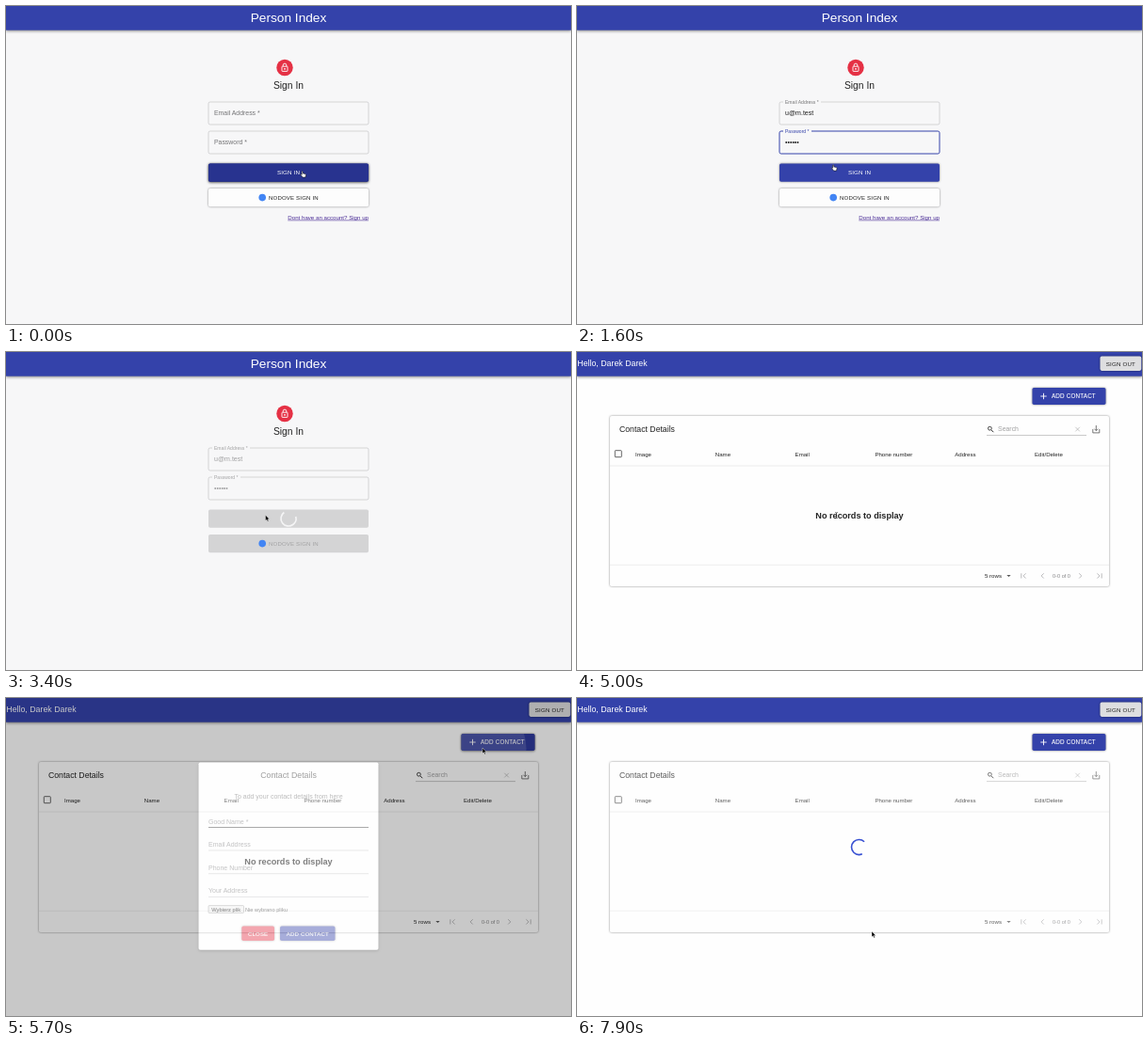
Animation, 600 px wide and 338 px high, one loop 8 s. Source, as an HTML page:

```html
<!DOCTYPE html>
<html lang="en">
<head>
<meta charset="utf-8">
<title>Sign in and add a contact</title>
<style>
html, body { margin: 0; width: 100%; height: 100%; overflow: hidden; background: #f7f7f8; }
svg { display: block; width: 100vw; height: 100vh; font-family: "Liberation Sans", Arial, sans-serif; }
.low { filter: drop-shadow(0 .7px .8px #0007); }
.high { filter: drop-shadow(0 1.4px 1.8px #0008); }
.bar { filter: drop-shadow(0 1.2px 1.6px #0007); }
.caps { letter-spacing: .17px; }
.line { fill: none; }
</style>
</head>
<body>
<svg id="stage" viewBox="0 0 600 338" preserveAspectRatio="none"></svg>
<script>
const LOOP = 8000;
const BLUE = '#3442aa', DARK = '#28338f', RED = '#e53145', INK = '#222', GREY = '#747476';

// Timing of the interface, in ms
const EMAIL = 300, PASSWORD = 900, SUBMIT = 2000, HOME = 4200, READY = 4650;
const PRESS = 5290, OPEN = 5600, FOCUS = 6800, SAVE = 7400;

// Pointer: time, x, y, shape until the next entry
const pointer = [
  [0, 314, 175.5, 'hand'], [80, 314, 175.5, 'hand'], [300, 270, 114, 'beam'],
  [1300, 270, 114, 'hand'], [1600, 271.5, 168.5, 'hand'], [1900, 275.5, 173, 'hand'],
  [SUBMIT, 275.5, 173, 'arrow'], [HOME, 275.5, 173.5, 'beam'], [5050, 275.5, 173.5, 'arrow'],
  [5300, 506, 53, 'arrow'], [5750, 506, 53, 'arrow'], [6400, 317, 131, 'beam'],
  [6900, 317, 131, 'arrow'], [7300, 313, 248, 'hand'], [SAVE, 313, 248, 'arrow'], [LOOP, 313, 248, 'arrow']
];

const clamp = v => Math.max(0, Math.min(1, v));
const ease = u => u * u * (3 - 2 * u);
const ramp = (t, from, span) => ease(clamp((t - from) / span));
const mix = (a, b, u) => a + (b - a) * u;

const text = (x, y, size, str, fill = INK, more = '') =>
  `<text x="${x}" y="${y}" font-size="${size}" fill="${fill}" ${more}>${str}</text>`;
const mid = (x, y, size, str, fill, more = '') => text(x, y, size, str, fill, 'text-anchor="middle" ' + more);
const box = (x, y, w, h, fill, more = '') =>
  `<rect x="${x}" y="${y}" width="${w}" height="${h}" fill="${fill}" ${more}/>`;
const path = (d, stroke, width = .8, more = '') =>
  `<path class="line" d="${d}" stroke="${stroke}" stroke-width="${width}" ${more}/>`;
const rule = (x1, x2, y, stroke, width = .5) => path(`M${x1} ${y}H${x2}`, stroke, width);
const group = (opacity, body) => `<g opacity="${opacity}">${body}</g>`;
const button = (x, y, w, h, fill, level = 'low') => box(x, y, w, h, fill, `rx="1.8" class="${level}"`);

function spinner(t, x, y, color, start, turn) {
  const p = ((t - start) / 1400 % 1 + 1) % 1;
  const grow = ease(clamp(p * 2)), slide = ease(clamp(p * 2 - 1));
  const dash = mix(1, 100, grow), offset = 15 * grow + 110 * slide;
  return `<circle class="line" cx="${x}" cy="${y}" r="8" stroke="${color}" stroke-width="1.6" pathLength="126"
    stroke-dasharray="${dash} 126" stroke-dashoffset="${-offset}" transform="rotate(${p * 360 + turn} ${x} ${y})"/>`;
}

function outlined(t, y, label, width, value, from, to) {
  const focused = t >= from && t < to, off = t >= SUBMIT, up = ramp(t, from, 150);
  const color = off ? '#a2a2a3' : focused ? BLUE : GREY;
  return box(215, y, 170, 24, 'none',
      `rx="1.8" stroke="${focused ? BLUE : '#bdbdbe'}" stroke-width="${focused ? 1 : .6}"`) +
    (up > .5 ? box(219, y - 1, width, 2, '#f7f7f8') : '') +
    text(221, mix(y + 14.2, y + 1.7, up), mix(6.9, 5.05, up), label + ' *', color) +
    text(221, y + 14.2, 7.05, value, off ? '#a2a2a3' : INK);
}

const typed = (t, str, from, span) => str.slice(0, Math.round(str.length * clamp((t - from) / span)));

function signIn(t) {
  const off = t >= SUBMIT;
  const hover = t < 1000 ? 1 - ramp(t, 100, 200) : ramp(t, 1600, 200);
  const lock = `<circle cx="296" cy="65.5" r="8.7" fill="${RED}"/>` +
    box(293, 64.2, 6, 5.2, 'none', 'rx=".5" stroke="#fff" stroke-width=".9"') +
    path('M294.2 64.2V62.9a1.8 1.8 0 0 1 3.6 0V64.2', '#fff', .9) +
    '<circle cx="296" cy="66.8" r=".9" fill="#fff"/>';
  const actions = off
    ? box(215, 167.5, 170, 19.3, '#d4d4d5', 'rx="1.8"') + box(215, 194, 170, 19.3, '#d4d4d5', 'rx="1.8"') +
      spinner(t, 300, 177, '#f5f5f6', 1090, 0)
    : button(215, 167.5, 170, 19.3, BLUE) +
      group(hover, button(215, 167.5, 170, 19.3, DARK, 'high')) +
      mid(300, 179.4, 6.2, 'SIGN IN', '#fff', 'class="caps"') +
      button(215, 194, 170, 19.3, '#fdfdfd') +
      text(385, 226.6, 6.15, 'Dont have an account? Sign up', '#4a2c96',
        'text-anchor="end" text-decoration="underline"');
  return box(0, 0, 600, 338, '#f7f7f8') + box(0, -5, 600, 30.7, BLUE, 'class="bar"') +
    mid(300, 17.2, 13.7, 'Person Index', '#fff') + lock + mid(300, 88.2, 10.3, 'Sign In') +
    outlined(t, 102, 'Email Address', 40, typed(t, 'u@m.test', 400, 400), EMAIL, PASSWORD) +
    outlined(t, 133, 'Password', 30, typed(t, '••••••', 950, 350), PASSWORD, SUBMIT) +
    actions + '<circle cx="272.2" cy="203.6" r="3.8" fill="#4285f4"/>' +
    text(279, 205.8, 6.05, 'NODOVE SIGN IN', off ? '#a2a2a3' : INK, 'class="caps"');
}

function addButton(t) {
  const lit = ramp(t, 5200, 200) * (1 - ramp(t, OPEN, 200));
  const reach = 47 * clamp((t - PRESS) / 210);
  return button(483.5, 38, 78, 18, BLUE) + group(lit, button(483.5, 38, 78, 18, DARK, 'high')) +
    `<clipPath id="edge">${box(483.5, 38, 78, 18, '#000', 'rx="1.8"')}</clipPath>` +
    `<circle cx="505.5" cy="53" r="${reach}" fill="#fff" opacity="${.22 * (1 - ramp(t, OPEN, 250))}" clip-path="url(#edge)"/>` +
    path('M492.3 47h6.4M495.5 43.8v6.4', '#fff', .9) +
    text(504, 49.3, 6.3, 'ADD CONTACT', '#fff', 'class="caps" stroke="#fff" stroke-width=".1"');
}

function table(t) {
  const loading = t < READY || t > SAVE + 150;
  const heads = ['Image', 'Name', 'Email', 'Phone number', 'Address', 'Edit/Delete'];
  const pager = '#b4b4b6';
  return box(35, 68, 530, 181, '#fefefe', 'rx="1.8" class="low"') +
    text(45, 84.8, 8.7, 'Contact Details') +
    '<circle class="line" cx="438.4" cy="81.2" r="1.9" stroke="#333" stroke-width=".9"/>' +
    path('M439.8 82.7l2.5 2.5', '#333', 1) + text(447, 84.4, 6.95, 'Search', '#a0a0a1') +
    rule(435, 541, 88.6, '#8c8c8d') + path('M529.3 79.8l4.6 4.6m0-4.6l-4.6 4.6', '#b0b0b1', .7) +
    path('M547.8 82v3.9h7V82M551.3 78v5.6m-1.9-1.9l1.9 1.9 1.9-1.9', '#555', .8) +
    box(40.3, 104.7, 7, 7, 'none', 'rx=".6" stroke="#555" stroke-width=".9"') +
    heads.map((h, i) => text(62 + i * 84.8, 110.6, 6.1, h)).join('') +
    rule(35, 565, 121, '#dadadb') + rule(35, 565, 226.3, '#dadadb') +
    (loading ? '' : mid(300, 176.7, 9.15, 'No records to display', INK, 'font-weight="bold"')) +
    text(433, 240, 6.1, '5 rows') + '<path d="M456.3 236.9h4.4l-2.2 2.2z" fill="#555"/>' +
    path('M471.8 235.3v5.2M476.6 235.3l-2.6 2.6 2.6 2.6', pager, .9) +
    path('M495.7 235.3l-2.6 2.6 2.6 2.6', pager, .9) + text(505, 239.9, 5.6, '0-0 of 0', '#858587') +
    path('M533.2 235.3l2.6 2.6-2.6 2.6', pager, .9) +
    path('M552.4 235.3l2.6 2.6-2.6 2.6M557.2 235.3v5.2', pager, .9) +
    (loading ? box(35, 68, 530, 181, '#fafafa', 'opacity=".28"') + spinner(t, 299.5, 158.5, '#3850d2', 6990, 80) : '');
}

function dialog(t) {
  const shown = ramp(t, OPEN, 225) * (1 - ramp(t, SAVE, 200));
  if (!shown) return '';
  const up = ramp(t, FOCUS, 200), reach = 85 * up;
  const labels = ['Email Address', 'Phone Number', 'Your Address'];
  const caret = t >= FOCUS - 100 && (t - FOCUS + 100) % 1000 < 500;
  return group(shown, box(0, 0, 600, 338, '#000', 'opacity=".5"') +
    box(204.5, 68.5, 191, 199.3, '#fefefe', 'rx="1.8" class="high"') +
    mid(300, 85, 8.8, 'Contact Details') +
    mid(300, 107.2, 7, 'To add your contact details from here', '#666') +
    text(215, mix(133.5, 124.8, up), mix(7, 5.25, up), 'Good Name *', up > .5 ? BLUE : GREY) +
    rule(215, 385, 137.5, INK, .9) + rule(300 - reach, 300 + reach, 137.5, BLUE, 1) +
    (caret ? path('M215.3 127v8', INK, .5) : '') +
    labels.map((l, i) => text(215, 158 + i * 24.6, 7, l, GREY) + rule(215, 385, 162 + i * 24.7, '#98989a')).join('') +
    box(215, 220.6, 37.5, 7.9, '#efefef', 'rx=".8" stroke="#666" stroke-width=".5"') +
    mid(233.7, 226.6, 5.75, 'Wybierz plik', '#111', 'stroke="#111" stroke-width=".1"') +
    text(254, 226.6, 5.7, 'Nie wybrano pliku') +
    button(250.3, 242.6, 34.7, 15.5, RED) +
    mid(267.7, 252.5, 6, 'CLOSE', '#fff', 'class="caps" stroke="#fff" stroke-width=".12"') +
    button(291, 242.6, 58.5, 15.5, BLUE) +
    mid(320.3, 252.5, 6.05, 'ADD CONTACT', '#fff', 'class="caps" stroke="#fff" stroke-width=".12"'));
}

const home = t => box(0, 0, 600, 338, '#fefefe') + box(0, -5, 600, 30.7, BLUE, 'class="bar"') +
  text(.3, 15, 8.8, 'Hello, Darek Darek', '#fff') +
  button(555.5, 4.6, 43.8, 15.3, '#dedee0') + mid(577.4, 14.5, 6.2, 'SIGN OUT', INK, 'class="caps"') +
  addButton(t) + table(t) + dialog(t);

const shapes = {
  arrow: '<path d="M0 0v6l1.4-1.2 1 2.2 1-.5-1-2.1h1.9z" fill="#000" stroke="#fff" stroke-width=".4"/>',
  beam: path('M-1.2-3q1.2 0 1.2 1v4q0 1-1.2 1M1.2-3q-1.2 0-1.2 1m0 4q0 1 1.2 1', '#222', .7),
  hand: '<path d="M0 .5q.6-1 1.1 0l.3 2 2.6.6q.7.3.5 1.2L4 6.6H1.2L-1 4q-.3-.8.5-.7l.8.5z" fill="#fff" stroke="#111" stroke-width=".55"/>'
};

function cursor(t) {
  const i = pointer.findIndex(k => k[0] > t), [t0, x0, y0, kind] = pointer[i - 1], [t1, x1, y1] = pointer[i];
  const u = ease((t - t0) / (t1 - t0));
  return `<g transform="translate(${mix(x0, x1, u)} ${mix(y0, y1, u)})">${shapes[kind]}</g>`;
}

const stage = document.getElementById('stage');
function draw() {
  const t = performance.now() % LOOP;
  stage.innerHTML = (t < HOME ? signIn(t) : home(t)) + cursor(t);
  requestAnimationFrame(draw);
}
draw();
</script>
</body>
</html>
```
